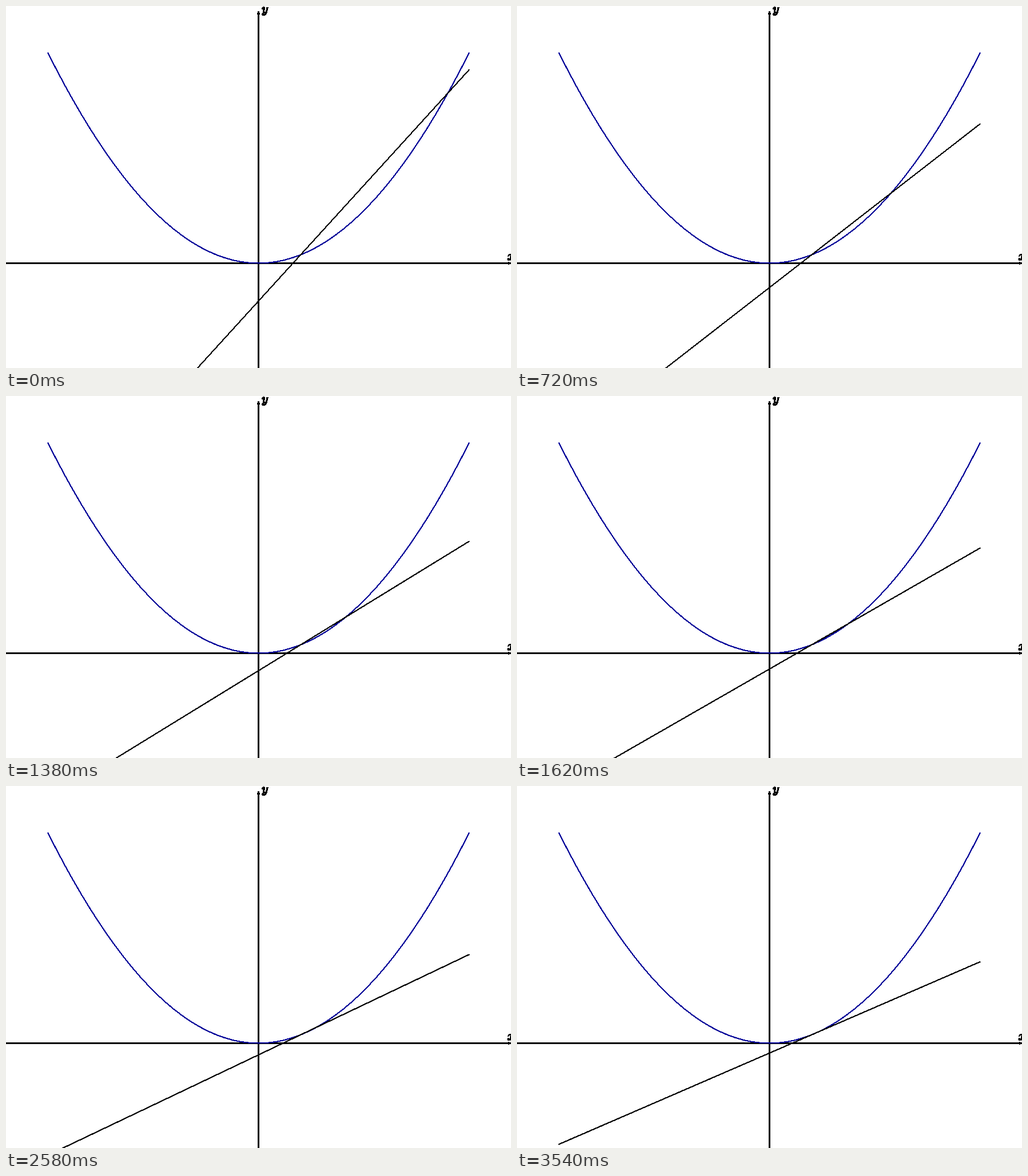
A matplotlib script that plays this animation: 883x634 px, repeating every 3600 ms.

```python
import matplotlib.pyplot as plt
import numpy as np
from matplotlib.animation import FuncAnimation
from matplotlib.collections import LineCollection
from matplotlib.patches import PathPatch
from matplotlib.path import Path
from matplotlib.textpath import TextPath

W, H, DPI = 883, 634, 100
FRAMES, INTERVAL = 60, 60
PT = 72 / DPI  # points per pixel
X0, Y0, UNIT = 441.5, 450.5, 73.6  # axis origin and unit length in pixels
NAVY = "#000099"

plt.rcParams["mathtext.fontset"] = "cm"

fig = plt.figure(figsize=(W / DPI, H / DPI), dpi=DPI, facecolor="white")
ax = fig.add_axes([0, 0, 1, 1])
ax.set_xlim(0, W)
ax.set_ylim(H, 0)
ax.axis("off")


def parabola(x):
    return 0.2 * x ** 2


def hairline(color, z):
    lines = LineCollection([], colors=color, antialiaseds=False, zorder=z,
                           capstyle="projecting")
    lines.set_snap(False)
    return ax.add_collection(lines, autolim=False)


def set_points(lines, xs, ys):
    """Join pixel points, thinning slanted parts to one pixel per step."""
    pts = np.column_stack([xs, ys])
    segments = np.stack([pts[:-1], pts[1:]], axis=1)
    step = np.abs(np.diff(pts, axis=0))
    lines.set_segments(segments)
    lines.set_linewidths(1.03 * PT * step.max(axis=1) / np.hypot(*step.T))


def set_graph(lines, xs, ys):
    set_points(lines, X0 + UNIT * xs, Y0 - UNIT * ys)


def label(x, y, text):
    glyph = TextPath((0, 0), text, size=22)
    path = Path(glyph.vertices * (1, -1) + (x, y), glyph.codes)
    ax.add_patch(PathPatch(path, color="black", lw=0.5 * PT, snap=False,
                           antialiased=False, zorder=4))


def arrow_head(points):
    ax.fill(*zip(*points), color="black", lw=0, snap=False,
            antialiased=False, zorder=4)


axes = hairline("black", 1)
set_points(axes, [0, W], [Y0, Y0])
set_points(hairline("black", 1), [X0, X0], [H, 10])
arrow_head([(W, Y0), (W - 5, Y0 - 2.2), (W - 5, Y0 + 2.2)])
arrow_head([(X0, 9), (X0 - 2.2, 14.5), (X0 + 2.2, 14.5)])
label(447, 12, "$y$")
label(876.5, 445, "$x$")

grid = np.linspace(-5, 5, 51)
set_graph(hairline(NAVY, 2), grid, parabola(grid))
secant = hairline("black", 3)


def update(i):
    # The second crossing closes in on x = 1 geometrically.
    second = 1 + 3.5 * 0.95 ** i
    slope = 0.2 * (1 + second)
    ends = np.array([-5, 5])
    set_graph(secant, ends, parabola(1) + slope * (ends - 1))
    return (secant,)


anim = FuncAnimation(fig, update, frames=FRAMES, interval=INTERVAL,
                     init_func=lambda: update(0), repeat=True, repeat_delay=0)
plt.show()
```
